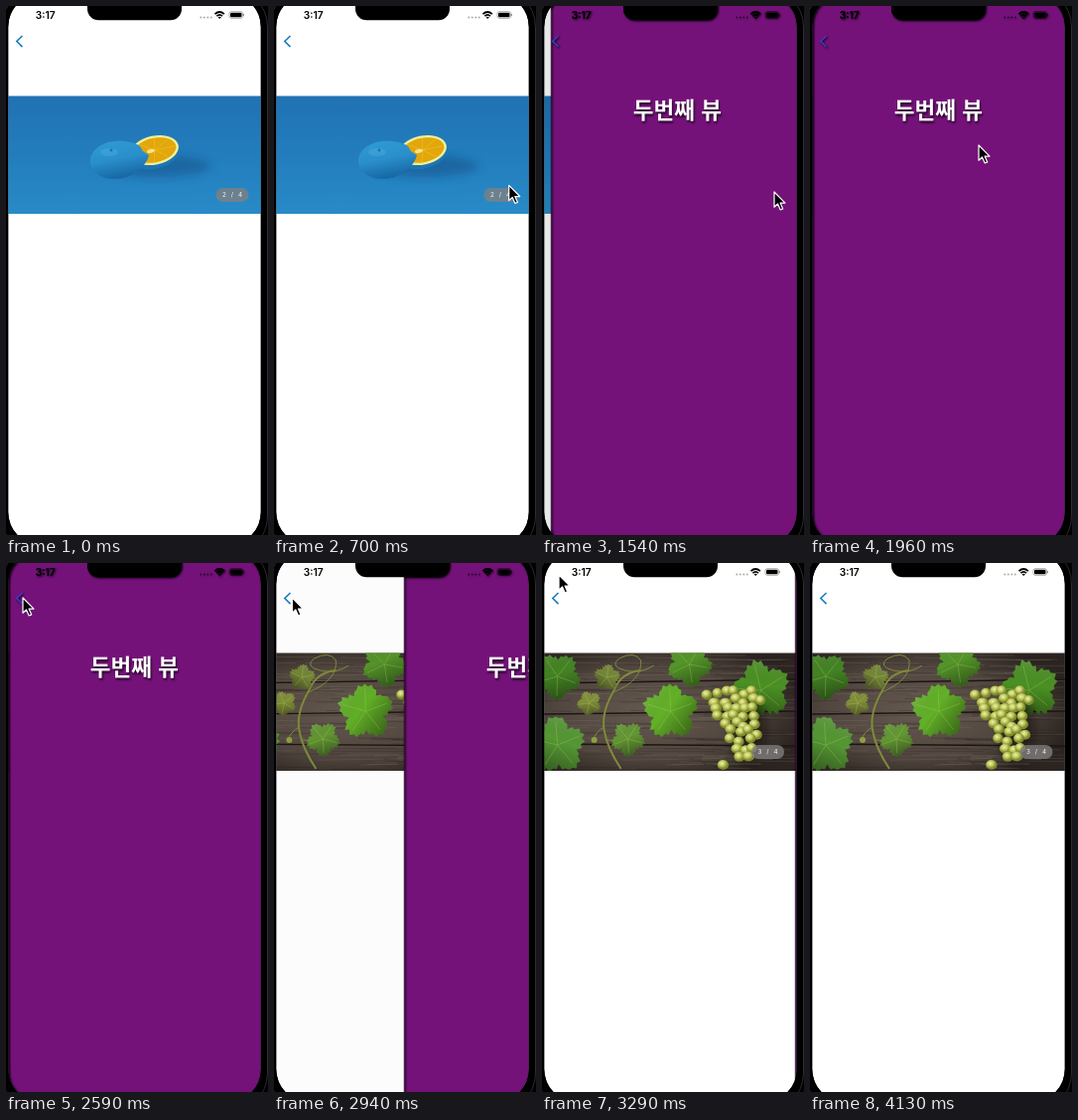
Recreate the animation shown at these times as an HTML page. Size 264 by 532 pixels, loop 4830 ms.

```html
<!DOCTYPE html>
<html lang="ko">
<head>
<meta charset="utf-8">
<style>
  html, body { margin: 0; height: 100%; overflow: hidden; background: #000; }
  svg.stage { display: block; width: 100vw; height: 100vh; }
  text { white-space: pre; }
  .clock { font: 600 10.2px Inter, Roboto, sans-serif; }
  .page { font: 500 6.2px Inter, Roboto, sans-serif; fill: #e8e8e8; text-anchor: middle; }
  .title { font: 700 22.5px "Noto Sans CJK KR", "Noto Sans CJK", sans-serif; fill: #fff; text-anchor: middle;
    filter: drop-shadow(1.5px 2px 1px rgba(0,0,0,.75)); }
  .cast { filter: drop-shadow(1px 1.5px 1.3px #000); }
</style>
</head>
<body>
<svg class="stage" viewBox="0 0 264 532">
  <defs>
    <clipPath id="screen"><rect x="2.2" y="-12" width="254.6" height="554" rx="33"/></clipPath>
    <clipPath id="cover"><rect id="coverRect" y="-12" width="256" height="554"/></clipPath>
    <linearGradient id="blue" x2="0" y2="1">
      <stop stop-color="#2072b3"/><stop offset=".5" stop-color="#237dbd"/><stop offset="1" stop-color="#288bc7"/>
    </linearGradient>
    <linearGradient id="peel" x2=".3" y2="1">
      <stop stop-color="#2f9bd5"/><stop offset=".55" stop-color="#2a8fcb"/><stop offset="1" stop-color="#186aa6"/>
    </linearGradient>
    <radialGradient id="wood" cx=".42" cy=".5" r=".62">
      <stop stop-color="#64584f"/><stop offset=".6" stop-color="#524740"/><stop offset="1" stop-color="#2b2420"/>
    </radialGradient>
    <radialGradient id="grape" cx=".4" cy=".35">
      <stop stop-color="#eef0b4"/><stop offset=".5" stop-color="#c3cc60"/><stop offset="1" stop-color="#7d8a2c"/>
    </radialGradient>
    <linearGradient id="gloss" x2=".6" y2="1">
      <stop stop-color="#fff" stop-opacity=".22"/><stop offset=".5" stop-opacity=".02"/><stop offset="1" stop-opacity=".4"/>
    </linearGradient>
    <linearGradient id="edge"><stop stop-opacity=".65"/><stop offset="1" stop-opacity="0"/></linearGradient>
    <filter id="soft" x="-50%" y="-50%" width="200%" height="200%"><feGaussianBlur stdDeviation="4"/></filter>
    <path id="chevron" d="M16.500 30 10.800 35.500l5.700 5.600" fill="none" stroke-width="1.6"/>
  </defs>

  <g clip-path="url(#screen)">
    <rect width="264" height="532" fill="#fff"/>
    <g id="under">
      <svg x="2" y="90.5" width="255" height="118.5" viewBox="2 90.5 255 118.5">
        <g id="orange">
          <rect x="2" y="90" width="255" height="120" fill="url(#blue)"/>
          <ellipse cx="152" cy="161" rx="54" ry="11" fill="#14568f" opacity=".6" filter="url(#soft)"/>
          <g transform="rotate(-12 150 146)">
            <ellipse cx="149" cy="147" rx="26" ry="16.5" fill="#1d76b3"/>
            <ellipse cx="150" cy="145" rx="24.5" ry="14.5" fill="#eff09a"/>
            <ellipse cx="150" cy="145" rx="22" ry="12.2" fill="#e3a60b"/>
            <path d="M150 145h21M150 145l15-8M150 145l2-12M150 145l-14-9M150 145l12 9M150 145l-3 12"
              stroke="#f2cb3c" stroke-width=".7" opacity=".6"/>
            <ellipse cx="146" cy="145" rx="4" ry="2" fill="#f4e58a"/>
          </g>
          <path d="M85 158C84 146 95 137 110 136C121 135 131 138 135 141L138 146L144 150C142 160 128 174 110 174C97 174 86 168 85 158Z"
            fill="url(#peel)"/>
          <ellipse cx="104" cy="147" rx="9" ry="4" fill="#55b3e2" opacity=".35"/>
          <circle cx="106" cy="145" r="1.4" fill="#1d6fa9"/>
        </g>
        <g id="grapes"></g>
      </svg>
      <rect x="211.5" y="183" width="33" height="14" rx="7" fill="#808080" opacity=".78"/>
      <text id="page" class="page" x="228" y="192.2"></text>
    </g>
    <use href="#chevron" stroke="#1a7ebf"/>
    <rect id="dim" width="264" height="532"/>
    <g id="over">
      <rect x="1.2" y="-12" width="1.5" height="554" opacity=".25"/>
      <rect x="2.2" y="-12" width="256" height="554" fill="#75127a"/>
      <rect x="2.2" y="-12" width="3.5" height="554" fill="url(#edge)"/>
      <text class="title" x="129.3" y="112.5">두번째 뷰</text>
    </g>
    <g clip-path="url(#cover)">
      <use href="#chrome" class="cast"/>
      <use href="#chevron" stroke="#3a3cc4" class="cast"/>
    </g>
  </g>

  <g id="chrome">
    <path fill-rule="evenodd" d="M-9-30H275V560H-9ZM2.2 21V509a33 33 0 0 0 33 33H223.8a33 33 0 0 0 33-33V21a33 33 0 0 0-33-33H35.200a33 33 0 0 0-33 33Z"/>
    <path d="M82-2V3a11.300 11.300 0 0 0 11.300 11.300H165.700A11.300 11.300 0 0 0 177 3V-2Z"/>
    <text class="clock" x="29.8" y="12.700">3:17</text>
    <path d="M196.300 11.500h11" stroke="#000" stroke-width="1.8" stroke-linecap="round" stroke-dasharray="0 3.5" opacity=".35"/>
    <path d="M210.500 8.200q4.700-4.400 9.400 0M212.400 10.200q2.800-2.600 5.600 0" fill="none" stroke="#000" stroke-width="1.7"/>
    <path d="M213.500 11.300q1.700-1.300 3.400 0l-1.700 1.800Z"/>
    <rect x="225" y="5.700" width="13.500" height="6.600" rx="2" fill="none" stroke="#000" stroke-width=".7" opacity=".45"/>
    <rect x="226" y="6.700" width="11.500" height="4.600" rx="1.200"/>
    <path d="M239.500 7.800v2.400" stroke="#000" stroke-width=".9" opacity=".45"/>
  </g>
  <rect x="-4.500" y="-19" width="268" height="572" rx="40" fill="none" stroke="#2c2c2c"/>
  <path id="cursor" d="M0 0V15.200L3.500 12 6.200 18 8.700 16.900 6.100 11.100H11Z" stroke="#fff" stroke-width="1.200" stroke-linejoin="round"/>
</svg>

<script>
const $ = id => document.getElementById(id);
const LOOP = 4830, STEP = 70, WIDTH = 254.5, LEFT = 2.2;

let seed = 7;
const rnd = () => (seed = seed * 16807 % 2147483647) / 2147483647;
const jitter = size => (rnd() - .5) * size;

// Five-lobed, toothed vine leaf with light veins
function leaf(x, y, r, turn, color) {
  let outline = '', veins = '';
  for (let i = 0; i < 50; i++) {
    const a = i * Math.PI / 25;
    const k = r * (.68 + .26 * Math.abs(Math.cos(2.5 * a)) + (i % 2 ? -.05 : .05) + jitter(.08));
    const px = k * Math.cos(a), py = k * Math.sin(a);
    outline += `${px},${py} `;
    if (i % 10 === 0) veins += `M0 0L${.8 * px} ${.8 * py}`;
  }
  return `<g transform="translate(${x} ${y}) rotate(${turn})">
    <polygon points="${outline}" fill="${color}"/>
    <polygon points="${outline}" fill="url(#gloss)"/>
    <path d="${veins}" stroke="#b9d66a" stroke-width=".6" opacity=".45"/></g>`;
}

function grapePicture() {
  let s = '<rect x="2" y="90" width="255" height="120" fill="url(#wood)"/>';
  for (let i = 0; i < 170; i++) {
    const x = rnd() * 250 - 20, y = 91 + rnd() * 118, w = 20 + rnd() * 60;
    s += `<path d="M${x} ${y}l${w} ${jitter(2)}" stroke="${i % 2 ? '#241d19' : '#85776b'}" stroke-width=".7" opacity=".35"/>`;
  }
  s += '<path d="M2 121L257 117M2 152L257 149M2 182L257 184" stroke="#1c1613" stroke-width="1.3"/>';
  s += leaf(16, 114, 25, 20, '#458624') + leaf(16, 183, 30, 50, '#579a35') + leaf(149, 102, 24, 10, '#56982a');
  s += `<g fill="none" stroke="#7f8a3a" stroke-width="1">
    <path d="M80 207Q66 186 63 168T73 128Q80 110 100 108" stroke-width="2"/>
    <path d="M72 130Q102 118 100 98Q94 88 78 96Q68 104 84 108T113 103M63 165Q54 170 52 178M66 178Q76 180 86 176"/></g>`;
  s += leaf(48, 141, 13, 30, '#84923a') + leaf(66, 115, 14, 60, '#78893a') + leaf(87, 177, 18, 15, '#659a35');
  s += leaf(130, 149, 29, -20, '#64b428') + leaf(221, 128, 31, 40, '#4c9324');
  s += '<ellipse cx="208" cy="168" rx="18" ry="34" fill="#15110d" opacity=".6" filter="url(#soft)"/>';
  // Rows of the bunch: y, first x, count
  const rows = [[131, 168, 6], [138, 176, 6], [146, 177, 5], [154, 177, 5], [162, 187, 4],
    [170, 190, 4], [178, 190, 3], [186, 195, 3], [194, 198, 2], [201, 185, 1]];
  for (const [y, x, n] of rows)
    for (let i = 0; i < n; i++)
      s += `<ellipse cx="${x + i * 9 + jitter(5)}" cy="${y + jitter(6)}" rx="${5.6 + jitter(1)}" ry="5" fill="url(#grape)"/>`;
  return s + '<circle cx="53" cy="178" r="3" fill="#8fa040"/>';
}
$('grapes').innerHTML = grapePicture();

// Pointer path: time, x, y
const path = [[70, 251, 502], [210, 246, 300], [420, 238, 174], [490, 238, 174], [980, 235, 189],
  [1260, 235, 189], [1540, 234, 187], [1750, 234, 187], [1960, 170, 140], [2170, 60, 62], [2310, 30, 45],
  [2590, 17, 35], [2800, 17, 35], [3010, 19, 35], [3290, 17, 12], [3360, 17, 12],
  [3640, 45, 150], [3920, 79, 428], [4060, 8, 522]];

function pointer(t) {
  const i = path.findIndex(p => p[0] >= t);
  if (i < 0 || t < path[0][0]) return null;
  if (i === 0) return path[0].slice(1);
  const a = path[i - 1], b = path[i], k = (t - a[0]) / (b[0] - a[0]);
  return [a[1] + (b[1] - a[1]) * k, a[2] + (b[2] - a[2]) * k];
}

// Critically damped spring: share of the way still to go
function spring(ms) {
  const x = Math.max(0, ms) * .0162;
  return (1 + x) * Math.exp(-x);
}

function draw(t) {
  const first = t < 2100;
  const away = first ? spring(t - 1203) : 1 - spring(t - 2835);
  const dx = WIDTH * away + (away > .998 ? 3 : 0);
  $('over').setAttribute('transform', `translate(${dx} 0)`);
  $('coverRect').setAttribute('x', LEFT + dx);
  $('under').setAttribute('transform', `translate(${-.3 * WIDTH * (1 - away)} 0)`);
  $('dim').setAttribute('opacity', .1 * (1 - away) ** 3);

  $('orange').style.display = first ? '' : 'none';
  $('grapes').style.display = first ? 'none' : '';
  $('page').textContent = `${first ? 2 : 3}   /   4`;

  const p = pointer(t);
  $('cursor').style.display = p ? '' : 'none';
  if (p) $('cursor').setAttribute('transform', `translate(${p})`);
}

const start = performance.now();
function tick() {
  const t = (performance.now() - start) % LOOP;
  draw(Math.floor(t / STEP) * STEP);
  requestAnimationFrame(tick);
}
tick();
</script>
</body>
</html>
```
